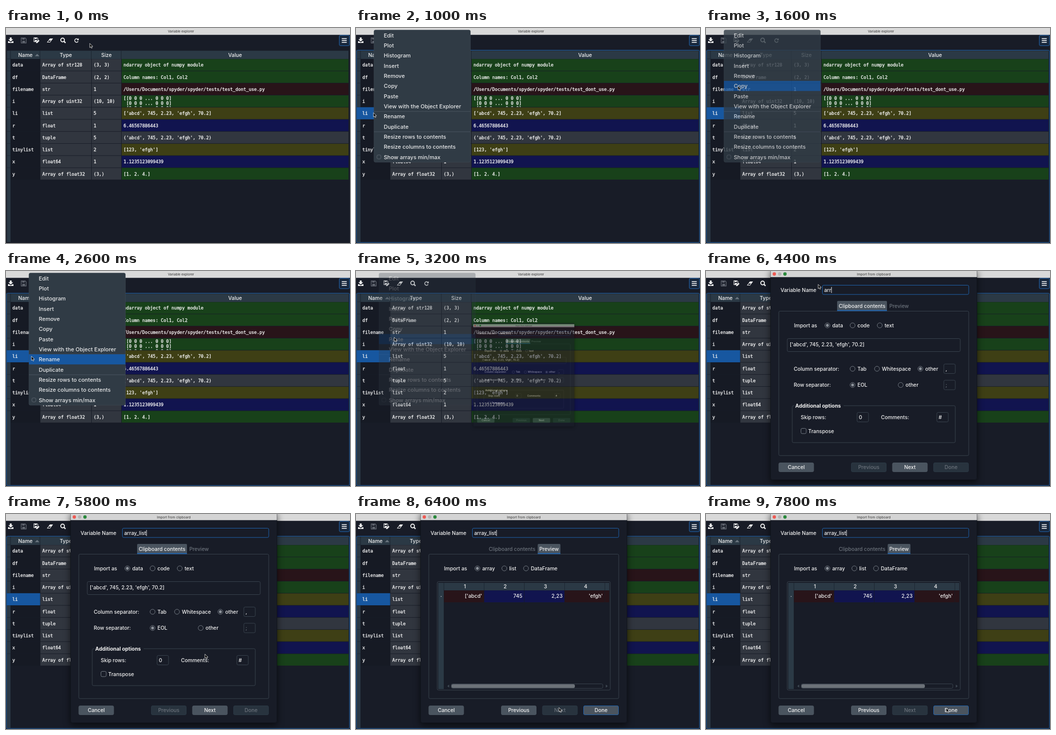
Recreate the animation shown at these times as an HTML page. Size 690x431 px, loop 8000 ms.

```html
<!DOCTYPE html>
<html lang="en">
<head>
<meta charset="utf-8">
<title>Variable explorer</title>
<style>
  html, body { margin: 0; width: 100%; height: 100%; overflow: hidden; background: #181c27; }
  svg { display: block; width: 100%; height: 100%; }
  text { white-space: pre; font: 500 10.3px Inter, "Open Sans", sans-serif; }
  .mono { font: 8.88px "DejaVu Sans Mono", monospace; stroke: #f2f2f2; stroke-width: .36px; }
  .menu { font-size: 11px; }
  .title { font-size: 6.6px; font-weight: 400; }
  .bold { font-weight: 700; }
</style>
</head>
<body>
<svg id="stage" viewBox="0 0 690 431"></svg>
<script>
const LOOP = 8000, STEP = 200;
const BG = '#181c27', HEAD = '#2b3945', GREY = '#31363f', GREEN = '#18411a', BLUE = '#11144f',
      RED = '#281419', OLIVE = '#3e3f15', SELECT = '#1757a0', FOCUS = '#1f62ab',
      LINE = '#38424d', BUTTON = '#4a545f', WHITE = '#f2f2f2', DIM = '#6b727b';

// Markup helpers; text is placed by its vertical centre.
const rect = (x, y, w, h, fill, extra = '') =>
  `<rect x="${x}" y="${y}" width="${w}" height="${h}" fill="${fill}" ${extra}/>`;
const frame = (x, y, w, h, stroke = LINE, fill = 'none') =>
  rect(x + .5, y + .5, w - 1, h - 1, fill, `rx="2.5" stroke="${stroke}"`);
const path = (d, fill, extra = '') => `<path d="${d}" fill="${fill}" ${extra}/>`;
const text = (x, y, str, { fill = WHITE, anchor = 'start', cls = '', id = '' } = {}) =>
  `<text x="${x}" y="${y + (cls === 'mono' ? 3 : cls === 'title' ? 2.4 : 3.8)}" fill="${fill}"
    text-anchor="${anchor}" class="${cls}" id="${id}">${str}</text>`;
const mid = (x, y, str, fill = WHITE, cls = '') => text(x, y, str, { fill, cls, anchor: 'middle' });
const group = (id, body, extra = '') => `<g id="${id}" ${extra}>${body}</g>`;
const at = (x, y, body) => `<g transform="translate(${x} ${y})">${body}</g>`;

// Main window
const icons = () => {
  const floppy = c => path('M-5-5H3L5-3V5H-5Z', 'none', `stroke="${c}" stroke-width="1.3"`) +
    rect(-3, -4.6, 5, 2.8, c) + rect(-2.8, .6, 5.6, 4, c);
  return at(9.5, 24.5, path('M-1.8-5.5H1.8V-2H4.8L0 2.8-4.8-2H-1.8Z', WHITE) +
      path('M-5.5 2H-3L-1 4H1L3 2H5.5V5.5H-5.5Z', WHITE)) +
    at(35.5, 25, floppy('#626771')) +
    at(60, 23.5, `<g transform="scale(.8)">${floppy(WHITE)}</g>` +
      path('M0 4.8 5-.2 7.5 2.3 2.8 7H0Z', WHITE, `stroke="${BG}" stroke-width=".7"`)) +
    at(88, 25, path('M-6 4 0-4H6.4L.4 4Z', WHITE) + path('M-4 2.9-1.8 0H2L-.2 2.9Z', BG)) +
    at(114, 24.5, path('M2.2 2.2 5.4 5.4', 'none', `stroke="${WHITE}" stroke-width="2.4"`) +
      `<circle cx="-.5" cy="-.5" r="3.7" fill="none" stroke="${WHITE}" stroke-width="1.9"/>`) +
    at(141.5, 25, path('M3.2 1.6A3.6 3.6 0 1 1 2.4-2.6', 'none', `stroke="${WHITE}" stroke-width="1.5"`) +
      path('M4.4-4.6V-.4H.2Z', WHITE));
};

const variables = [
  ['data', 'Array of str128', '(3, 3)', GREEN, 'ndarray object of numpy module'],
  ['df', 'DataFrame', '(2, 2)', GREEN, 'Column names: Col1, Col2'],
  ['filename', 'str', '1', RED, '/Users/Documents/spyder/spyder/tests/test_dont_use.py'],
  ['i', 'Array of uint32', '(10, 10)', GREEN, ''],
  ['li', 'list', '5', OLIVE, "['abcd', 745, 2.23, 'efgh', 70.2]"],
  ['r', 'float', '1', BLUE, '6.46567886443'],
  ['t', 'tuple', '5', GREY, "('abcd', 745, 2.23, 'efgh', 70.2)"],
  ['tinylist', 'list', '2', OLIVE, "[123, 'efgh']"],
  ['x', 'float64', '1', BLUE, '1.1235123099439'],
  ['y', 'Array of float32', '(3,)', GREEN, '[1. 2. 4.]'],
];
const columns = [[9, 59], [69, 102], [172, 59], [232, 455]];
const ROW = 24.25, rowTop = k => 62.3 + ROW * k;

const tableRow = ([name, type, size, color, value], k) => {
  const y = rowTop(k), fills = ['#161a24', GREY, GREY, color];
  return columns.map(([x, w], c) => rect(x, y, w, ROW - .9, fills[c])).join('') +
    (name === 'li' ? group('selected', rect(1.5, y - .5, 67, ROW, SELECT)) : '') +
    [name, type, size, value].map((s, c) =>
      text(columns[c][0] + 3.8, y + 12, s, { cls: 'mono' })).join('');
};

const mainWindow = () =>
  rect(0, 0, 690, 431, BG) + rect(0, 0, 690, 13.7, '#d9d9d9') +
  mid(351, 7, 'Variable explorer', '#333', 'title') + icons() +
  frame(668, 14, 21.5, 22, FOCUS, '#18283d') +
  [21.3, 25, 28.7].map(y => rect(673.5, y - .8, 10, 1.7, WHITE)).join('') +
  rect(2, 45.5, 685, 16.5, HEAD) + rect(2, 62, 7, 367, HEAD) +
  [9, 68, 171, 231].map(x => rect(x - .4, 45.5, .9, 16.5, '#1b222d')).join('') +
  variables.map((_, k) => rect(2, rowTop(k) - .9, 7, .9, '#202a35')).join('') +
  ['Name', 'Type', 'Size', 'Value'].map((s, c) => mid([39, 120, 201.5, 459.5][c], 54.1, s)).join('') +
  path('M58 56.5 62.5 52 67 56.5Z', '#6b7680') + variables.map(tableRow).join('') +
  `<clipPath id="cell">${rect(232, rowTop(3), 455, ROW - 1, '#fff')}</clipPath><g clip-path="url(#cell)">` +
  [0, 1, 2].map(n => text(235.8, 140.5 + n * 10.4, `${n ? ' ' : '['}[0 0 0 ... 0 0 0]`, { cls: 'mono' })).join('') +
  '</g>' + group('focus', frame(.5, 44, 689, 386.5, FOCUS));

// Context menu, drawn at the left edge and moved into place
const MENU_W = 193.5, ITEM = 20.33, ITEM_TOP = 4.3;
const items = ['Edit', 'Plot', 'Histogram', 'Insert', 'Remove', 'Copy', 'Paste',
  'View with the Object Explorer', 'Rename', 'Duplicate', 'Resize rows to contents',
  'Resize columns to contents', 'Show arrays min/max'];
const menu = () =>
  rect(0, 4, MENU_W, 265, '#303b45', 'rx="3" stroke="#414c56" stroke-width=".6"') +
  [166.8, 207.6].map(y => rect(0, y, MENU_W, .8, '#505b66')).join('') +
  rect(0, 0, MENU_W, ITEM, SELECT, 'id="hover"') +
  items.map((s, k) => text(19.7, 15 + ITEM * k, s, { cls: 'menu', fill: '#e9eaeb' })).join('') +
  frame(5.5, 254, 9, 9, '#59626c');

// Import dialog
const radio = (x, y, label, on) =>
  `<circle cx="${x}" cy="${y}" r="5" fill="none" stroke="#747b84"/>` +
  (on ? `<circle cx="${x}" cy="${y}" r="2.9" fill="#8b9199"/>` : '') + text(x + 9.7, y, label);
const field = (x, y, value, fill) => frame(x, y, 24, 20) + text(x + 4, y + 10, value, { fill });
const button = (x, label, on, focused) =>
  frame(x, 384, 71, 19, focused ? FOCUS : on ? BUTTON : HEAD, on ? BUTTON : '#28333e') +
  mid(x + 35.5, 393.5, label, on ? WHITE : DIM);
const tab = (x, w, label, on) =>
  (on ? rect(x, 60, w, 20, BUTTON, 'rx="2"') + rect(x, 78.3, w, 2, FOCUS) : '') +
  mid(x + w / 2, 70, label, on ? WHITE : DIM);

const contentsPage = () =>
  tab(263, 100, 'Clipboard contents', true) + tab(364.5, 45.5, 'Preview') +
  radio(243.5, 109, 'data', true) + radio(294, 109, 'code') + radio(348.5, 109, 'text') +
  frame(162.5, 135, 348, 27) + text(168, 147, variables[4][4]) +
  text(176, 196, 'Column separator:') + radio(294, 196, 'Tab') + radio(343, 196, 'Whitespace') +
  radio(430, 196, 'other', true) + field(476.5, 186, ',') +
  text(176, 228.5, 'Row separator:') + radio(294, 228.5, 'EOL', true) + radio(390.5, 228.5, 'other') +
  field(476.5, 218.5, ';', DIM) +
  frame(172.5, 269.5, 328, 75) + rect(177, 265, 99, 10, BG) +
  text(179, 270, 'Additional options', { cls: 'bold' }) +
  text(190, 293, 'Skip rows:') + field(302.5, 283, '0') +
  text(351, 293, 'Comments:') + field(462.5, 283, '#') +
  frame(190, 315, 11.5, 11.5, '#747b84') + text(205, 321, 'Transpose') +
  button(291, 'Previous') + button(373.5, 'Next', true) + button(456, 'Done');

const previewPage = () => {
  const cells = ["['abcd'", '745', '2,23', "'efgh'", ''];
  return tab(263, 100, 'Clipboard contents') + tab(364.5, 45.5, 'Preview', true) +
    radio(243.5, 109, 'array', true) + radio(297.5, 109, 'list') + radio(341, 109, 'DataFrame') +
    frame(162.5, 135, 348, 218.5) + rect(165, 138, 11, 213, HEAD) + rect(176, 138, 332, 15, HEAD) +
    cells.map((s, c) => {
      const x = 176.5 + 80.7 * c, w = c < 4 ? 80 : 8.5;
      return rect(x, 153.3, w, 23.7, c === 1 || c === 2 ? BLUE : RED) + rect(x - .6, 138, .8, 15, '#1b222d') +
        (c < 4 ? mid(x + 42, 145.5, c + 1) + text(x + 76.5, 164.5, s, { anchor: 'end' }) : '');
    }).join('') +
    mid(170.7, 162, '.') + frame(190.5, 340, 305, 10) +
    rect(191.5, 341.3, 247.5, 7.4, '#6c7279', 'rx="3"') +
    path('M187 342V348L183 345Z', '#3d4650') + path('M501 342V348L505 345Z', '#3d4650') +
    button(291, 'Previous', true) + button(373.5, 'Next') + button(456, 'Done', true, true);
};

const dialog = () =>
  rect(129.5, -4, 414, 422.5, BG, 'rx="4" stroke="#10131b" stroke-width=".8" style="filter:drop-shadow(0 4px 7px #0009)"') +
  rect(129.5, 0, 414, 12.3, '#d4d4d4') +
  ['#ee5b54', '#b5b5b5', '#2b8a3c'].map((c, k) => `<circle cx="${137 + 10.7 * k}" cy="6" r="3.4" fill="${c}"/>`).join('') +
  mid(336.5, 6.2, 'Import from clipboard', '#333', 'title') +
  text(149.5, 38, 'Variable Name') + frame(233, 28, 294.5, 19.5, FOCUS) +
  text(237, 38, '', { id: 'name' }) + rect(0, 32, 1, 12, WHITE, 'id="caret"') +
  frame(145.5, 80, 382, 290.5) + text(176.5, 109, 'Import as') +
  group('contents', contentsPage()) + group('preview', previewPage()) + button(145.5, 'Cancel', true);

const pointer = () => at(-1, -1.2,
  path('M0 0V8.6L2 6.8 3.4 9.8 4.9 9.1 3.5 6.2H6.2Z', '#050505', `stroke="${WHITE}" stroke-width=".8"`));

const stage = document.getElementById('stage');
stage.innerHTML = mainWindow() + group('menu', menu()) + group('dialog', dialog()) + group('pointer', pointer());
const el = id => document.getElementById(id);
const show = (id, opacity) => el(id).setAttribute('opacity', +opacity);

// Timeline: [ms, ...values]
const pointerKeys = [[0, 169, 32], [400, 169, 32], [800, 42, 166], [1000, 36, 171], [1200, 48, 150],
  [1400, 64, 119], [1600, 65, 117], [1800, 62, 124], [2200, 46, 171], [2400, 46, 171], [2600, 52, 172],
  [2800, 68, 145], [3000, 77, 135], [3400, 78, 133], [3800, 162, 62], [4000, 212, 33], [4200, 226, 28],
  [5200, 226, 28], [5800, 400, 282], [6200, 408, 389], [7400, 408, 390], [7800, 483, 390], [LOOP, 483, 390]];
const menuKeys = [[0, 36, 0], [1000, 36, 1], [1600, 36, .8], [1800, 36, 0], [2400, 46, 1], [3200, 46, .27], [3400, 46, 0]];
const dialogKeys = [[0, 1, 0], [3200, .49, .5], [3400, .93, .92], [3600, 1, 1]];
const nameKeys = [[0, 'data_000'], [4200, 'a'], [4400, 'arr'], [4600, 'arra'], [4800, 'array'],
  [5000, 'array_'], [5200, 'array_li'], [5400, 'array_list']];

const held = (keys, t) => keys.findLast(k => k[0] <= t);
const between = (keys, t) => {
  const i = keys.findIndex(k => k[0] > t), [t0, x0, y0] = keys[i - 1], [t1, x1, y1] = keys[i];
  const p = (t - t0) / (t1 - t0);
  return [x0 + (x1 - x0) * p, y0 + (y1 - y0) * p];
};

function draw(t) {
  const [px, py] = between(pointerKeys, t);
  el('pointer').setAttribute('transform', `translate(${px} ${py})`);
  show('selected', t >= 1000);
  show('focus', t >= 1000);

  const [, menuX, menuAlpha] = held(menuKeys, t);
  const item = Math.floor((py - ITEM_TOP) / ITEM);
  el('menu').setAttribute('transform', `translate(${menuX} 0)`);
  show('menu', menuAlpha);
  el('hover').setAttribute('y', ITEM_TOP + item * ITEM);
  show('hover', px > menuX + 2);

  const [, scale, dialogAlpha] = held(dialogKeys, t);
  el('dialog').setAttribute('transform', `translate(336.5 209) scale(${scale}) translate(-336.5 -209)`);
  show('dialog', dialogAlpha);
  el('name').textContent = held(nameKeys, t)[1];
  el('caret').setAttribute('x', 237.3 + el('name').getComputedTextLength());
  show('caret', t < 5400 || (t - 5400) % 1000 < 500);
  show('contents', t < 6400);
  show('preview', t >= 6400);
}

const start = performance.now();
function tick() {
  const t = (performance.now() - start) % LOOP;
  draw(Math.floor(t / STEP) * STEP);
  requestAnimationFrame(tick);
}
tick();
</script>
</body>
</html>
```
